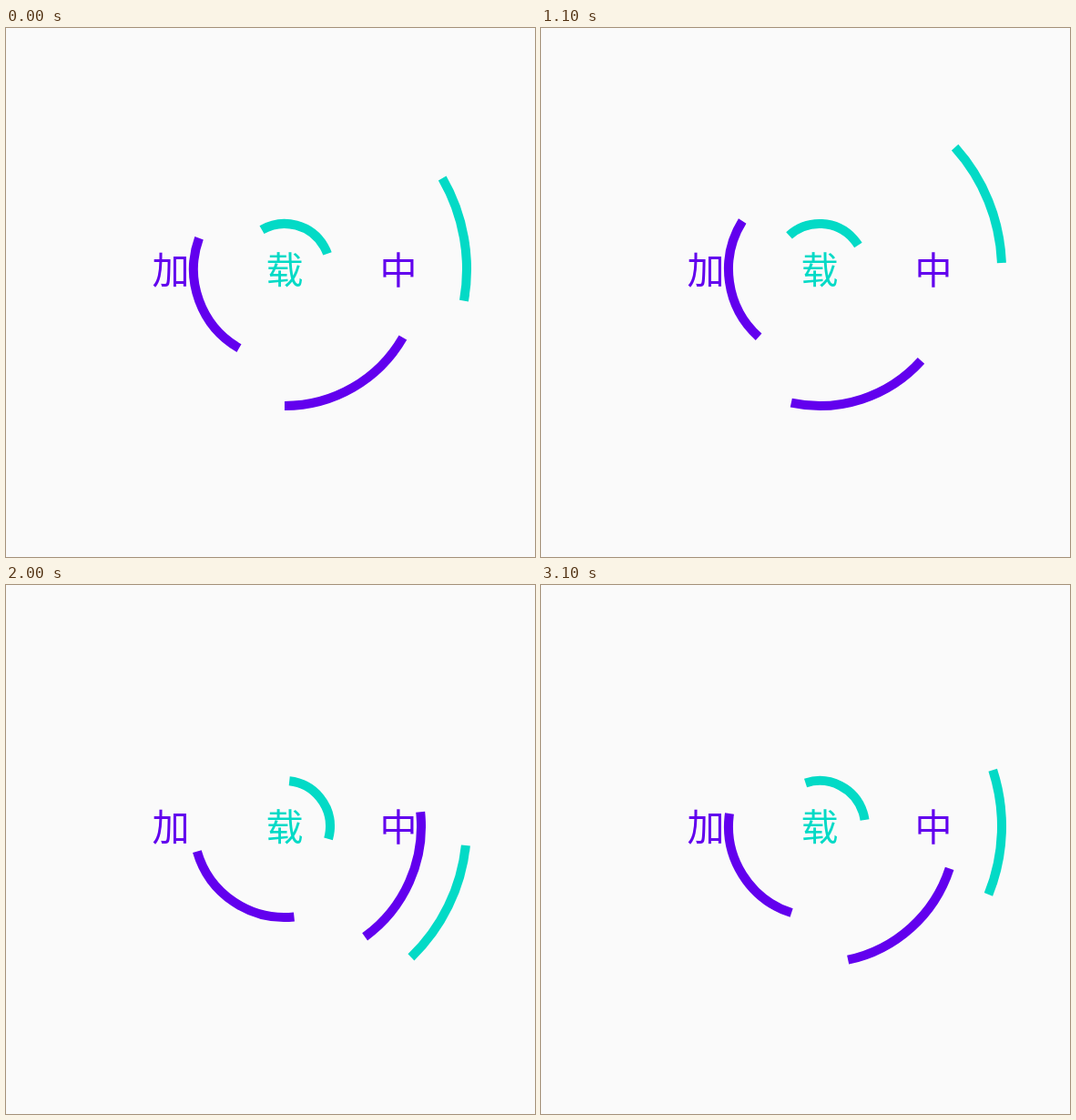
Recreate the animation shown at these times as an HTML page. Size 581 by 581 pixels, loop 3200 ms.

```html
<!DOCTYPE html>
<html lang="zh">
<head>
<meta charset="utf-8">
<style>
  html, body { margin: 0; height: 100%; overflow: hidden; background: #fafafa; }
  svg { display: block; width: 581px; height: 581px; }
  circle { fill: none; stroke-width: 10; }
  text { font: 41px "Noto Sans CJK SC", "Noto Sans CJK", "Noto Sans CJK JP", sans-serif; text-anchor: middle; }
</style>
</head>
<body>
<svg viewBox="0 0 581 581"></svg>
<script>
const PURPLE = '#6200ee', TEAL = '#03dac6';
const CENTER = { x: 306, y: 265 };
const LOOP = 3200, STEP = 100;
const svg = document.querySelector('svg');

function add(name, attributes, content = '') {
  const node = document.createElementNS('http://www.w3.org/2000/svg', name);
  for (const key in attributes) node.setAttribute(key, attributes[key]);
  node.textContent = content;
  return svg.appendChild(node);
}

// Angles in degrees, clockwise from the right; spin is the turning direction.
const arcs = [
  { radius: 50, start: 240, span: 100, spin: -1, color: TEAL },
  { radius: 100, start: 120, span: 80, spin: 1, color: PURPLE },
  { radius: 150, start: 30, span: 60, spin: 1, color: PURPLE },
  { radius: 200, start: -30, span: 40, spin: -1, color: TEAL }
];

for (const arc of arcs) {
  arc.node = add('circle', {
    cx: CENTER.x, cy: CENTER.y, r: arc.radius, stroke: arc.color,
    pathLength: 360, 'stroke-dasharray': `${arc.span} ${360 - arc.span}`
  });
}

add('text', { x: 181, y: 281, fill: PURPLE }, '加');
add('text', { x: 306, y: 281, fill: TEAL }, '载');
add('text', { x: 431, y: 281, fill: PURPLE }, '中');

// One turn takes about a second, in ticks of 6 degrees.
function turnAt(time) {
  const step = Math.floor(time % LOOP / STEP);
  return 6 * Math.max(0, Math.floor(5.8 * step - 1.3));
}

function draw(time) {
  const turn = turnAt(time);
  for (const { node, start, spin } of arcs) {
    node.setAttribute('transform', `rotate(${start + spin * turn} ${CENTER.x} ${CENTER.y})`);
  }
}

let begin;
function tick(now) {
  begin ??= now;
  draw(now - begin);
  requestAnimationFrame(tick);
}
draw(0);
requestAnimationFrame(tick);
</script>
</body>
</html>
```
